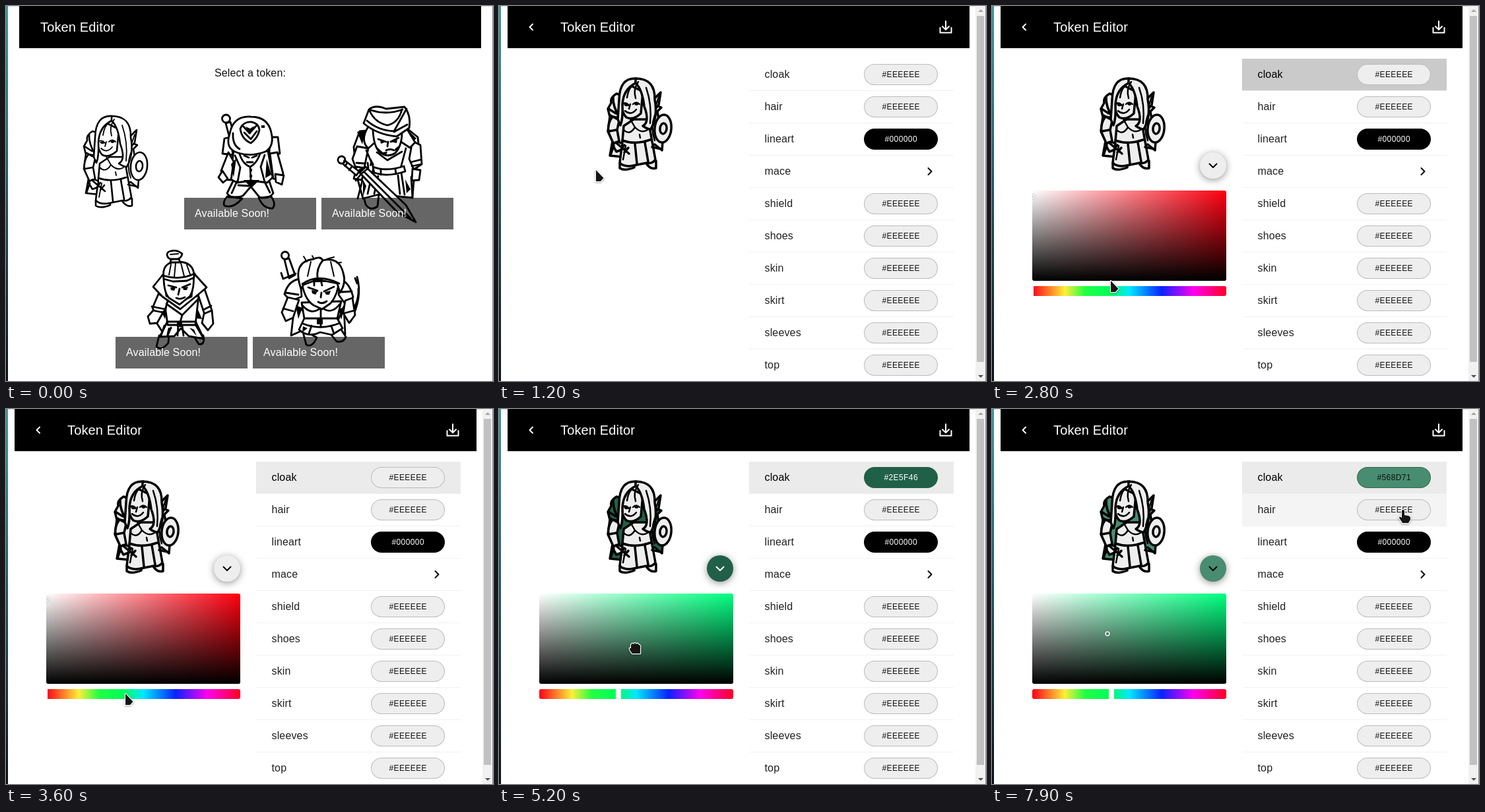
An HTML page with a canvas for the animation above (8 s loop, 738x569 px).

```html
<!DOCTYPE html>
<html lang="en">
<head>
<meta charset="utf-8">
<title>Token Editor</title>
<style>
html, body { margin: 0; width: 100%; height: 100%; overflow: hidden; background: #fff; }
canvas { display: block; width: 738px; height: 569px; }
</style>
</head>
<body>
<canvas id="stage" width="738" height="569"></canvas>
<script>
const ctx = document.getElementById('stage').getContext('2d');
const LOOP = 8000, STEP = 100;
const FONT = '"Liberation Sans", Arial, sans-serif';
const PICK = { x: 61, y: 280, w: 294, h: 137 };
const GREY = [238, 238, 238], DEEP = [32, 96, 73], SOFT = [72, 141, 113];

// Figures: [layer, path]. b = filled body, c = filled cloak, l = line, t = thin line, k = solid black
const shapes = list => list.map(([kind, d]) => [kind, new Path2D(d)]);

const elf = shapes([
  ['c', 'M178 133Q168 139 170 147L165 156 168 168 165 190 172 205 168 227 188 229 236 210 247 219 248 206 240 160 246 154 236 150Z'],
  ['b', 'M172 168Q164 178 166 192L174 210 182 205 179 188 183 170Z'],
  ['l', 'M173 138Q172 152 183 170M166 156L177 163M167 190L178 188M169 166L178 171'],
  ['b', 'M183 238L183 246Q190 251 205 245L205 236ZM222 237Q229 249 238 246L238 235Z'],
  ['b', 'M189 182L187 205 183 238Q190 245 204 242L224 238Q232 240 237 233L231 200 226 172 204 172Z'],
  ['l', 'M187 204Q206 211 229 203M206 209L209 239M221 207L226 236'],
  ['t', 'M189 188Q198 197 206 184Q216 194 225 188M199 172L206 184M192 212L188 233M213 195L214 200'],
  ['b', 'M172 211Q178 203 187 209L186 218 178 221Z'],
  ['l', 'M178 208L197 224M184 219L190 211M190 222L196 215M169 226L174 212M232 214L246 217'],
  ['b', 'M187 140Q184 160 193 169Q203 174 215 163L218 130 198 120Z'],
  ['t', 'M187 149Q192 145 197 151M203 149Q208 144 213 149M191 159Q200 167 208 157M199 149L197 156'],
  ['k', 'M189 150Q192 147 196 151Q193 154 189 150ZM205 149Q209 145 212 149Q208 153 205 149Z'],
  ['b', 'M234 142L245 131 242 150 236 157Z'],
  ['b', 'M208 110Q183 108 182 142L180 172 184 181Q188 172 187 150Q188 126 207 117Z'],
  ['b', 'M207 110Q237 110 236 142Q241 168 230 187Q225 187 218 182Q229 176 220 152Q217 126 207 117Z'],
  ['t', 'M223 124Q232 150 229 178M205 118Q196 124 194 139M211 115Q203 126 207 140M238 150L242 138'],
  ['b', 'M250 165A12.5 21 6 1 1 247 207A12.5 21 6 1 1 250 165Z'],
  ['l', 'M250 178A5 8 6 1 1 248 194A5 8 6 1 1 250 178Z'],
  ['t', 'M236 166Q229 185 236 204']
]);

const scout = shapes([
  ['b', 'M340 199L331 201 328 224 344 226ZM400 199L412 199 415 224 399 224Z'],
  ['b', 'M334 165A6 6 0 1 1 333 177A6 6 0 1 1 334 165ZM333 178L340 176 345 192 338 197Z'],
  ['b', 'M335 289Q328 298 331 303Q344 308 358 292ZM383 291Q390 308 404 307Q410 300 401 288Z'],
  ['b', 'M346 262L335 284Q341 294 359 288L371 274 384 290Q398 294 405 284L397 260Z'],
  ['b', 'M345 220L339 262 350 268 371 265 396 268 404 260 397 220Z'],
  ['b', 'M337 222L326 250 329 263 341 264 345 236ZM400 224L411 222 420 254 416 265 405 262Z'],
  ['b', 'M328 250L322 260 329 268 336 262ZM408 255L421 257 418 271 409 267Z'],
  ['l', 'M347 227L355 245 351 267M392 226L386 244 392 267M370 244L371 265M350 266L342 284M392 267L400 283M352 272L368 273M337 290L354 290M387 291L402 289'],
  ['k', 'M369 247h4v4h-4ZM369 256h4v4h-4ZM360 264L384 264 372 276ZM341 240L349 231 345 260ZM395 232L402 256 393 261Z'],
  ['b', 'M352 216Q356 239 370 244Q383 237 387 216Z'],
  ['l', 'M361 227L368 230M373 230L380 227M365 237L374 237'],
  ['b', 'M371 168Q344 166 339 194Q331 217 352 223Q372 229 393 221Q407 213 402 192Q397 168 371 168Z'],
  ['l', 'M355 186Q360 175 372 176Q383 178 384 188Q382 200 371 208Q357 202 355 186ZM360 183L369 193 379 182M361 192L371 202 380 190M344 193Q343 211 354 217'],
  ['k', 'M387 181h5v4h-5ZM363 183L370 186 376 182 370 195Z']
]);

const pirate = shapes([
  ['b', 'M541 286L545 301Q552 312 563 304L565 286Z'],
  ['b', 'M536 190L527 214 532 260 541 292 565 286 616 291 614 260 628 236 624 199 608 186Z'],
  ['b', 'M532 213L525 232 532 251 543 245 549 216ZM616 205L628 211 630 240 618 248 611 232Z'],
  ['b', 'M530 250L527 262 539 264 543 251ZM616 247L628 249 626 264 615 265Z'],
  ['l', 'M546 219L557 245 548 285M606 216L598 246 604 286M531 238L544 239M531 244L544 246M613 237L629 233M615 243L630 240M540 265L533 292M618 265L616 290'],
  ['b', 'M556 244Q576 252 603 243L605 251Q578 260 558 253Z'],
  ['l', 'M568 248L568 256M590 247L591 255M562 222L578 234 600 221M564 258L558 285M594 257L597 285'],
  ['k', 'M532 191L544 188 540 210ZM609 188L622 201 611 210ZM541 264L546 273 541 289ZM605 263L613 278 607 284ZM553 231L558 241 551 243Z'],
  ['b', 'M549 183Q536 204 549 216L559 207 600 207 612 215 620 207 606 184Z'],
  ['b', 'M556 188Q557 212 566 222Q579 231 590 223Q601 211 600 187Z'],
  ['l', 'M564 202L576 206M583 206L595 200M576 219Q582 216 588 219M579 206L578 213'],
  ['k', 'M567 203L576 206 568 209ZM583 206L593 203 592 208ZM560 212L571 222 578 221 576 226 566 222ZM589 217L598 210 591 224Z'],
  ['b', 'M542 178L550 157Q559 149 576 156L604 153Q614 166 611 185L592 198Q562 195 542 178Z'],
  ['l', 'M547 174Q564 189 588 190L607 156M551 159Q559 177 578 181Q595 177 600 157M553 158Q577 166 601 157M588 191L608 180'],
  ['b', 'M509 228A5 5 0 1 1 508 239A5 5 0 1 1 509 228ZM513 234L535 251 531 257 511 240Z'],
  ['b', 'M536 253L545 244 606 302 621 328 593 313Z'],
  ['l', 'M544 253L613 322M548 238L549 246 538 255 530 265M517 238L514 243M524 244L520 249']
]);

const monk = shapes([
  ['b', 'M232 500L228 517Q236 524 246 511L247 500ZM284 500L292 513Q302 515 299 500Z'],
  ['b', 'M244 480L233 502 255 501 265 489 277 501 300 505 287 478Z'],
  ['b', 'M239 441L245 484 287 484 292 439 264 450Z'],
  ['b', 'M231 437L222 458 225 464 240 465 246 444ZM290 435L301 430 312 462 301 468Z'],
  ['b', 'M223 462L215 471 218 482 229 481 238 465ZM300 467L312 462 314 482 306 492 297 481Z'],
  ['l', 'M221 456L241 460M299 461L311 455M243 452L267 469 290 446M267 469L263 483M244 479L288 479M240 485L235 500M288 485L298 502M261 484L260 500M267 485L269 500M250 488L245 500M229 482L236 493'],
  ['k', 'M259 480h8v7h-8ZM236 465L244 456 241 475ZM289 456L297 475 289 474ZM246 488L252 488 243 500ZM278 488L285 491 289 501Z'],
  ['b', 'M239 406L223 426 237 441 264 460 291 438 304 427 285 406 281 441 263 449 243 440Z'],
  ['b', 'M239 411Q239 434 247 443L263 453 279 440Q286 427 284 409Z'],
  ['l', 'M246 424L258 427M267 427L279 422M258 443Q264 446 271 442M263 429L261 438'],
  ['k', 'M249 427L257 427 255 432 250 431ZM268 427L276 426 274 431 269 431Z'],
  ['b', 'M239 414Q235 388 260 388Q286 388 285 412L274 417 253 418Z'],
  ['t', 'M250 392L247 408M257 390L255 411M265 390L270 410M274 393L279 407'],
  ['l', 'M238 409Q263 417 286 406'],
  ['b', 'M249 372Q259 369 267 376Q265 385 256 384Q246 386 244 378Q244 373 249 372ZM250 384L262 384 264 389 249 389Z'],
  ['t', 'M249 377L261 376']
]);

const ranger = shapes([
  ['b', 'M424 373A5 5 0 1 1 422 384A5 5 0 1 1 424 373ZM422 385L429 383 438 408 429 413Z'],
  ['l', 'M417 405L420 414 439 406M532 411Q541 442 522 479M529 413L532 421M534 429Q535 453 519 469'],
  ['b', 'M437 455L432 500 452 491 455 465ZM512 456L514 498 498 489Z'],
  ['b', 'M449 491L455 514Q464 519 471 503ZM489 494L501 509Q512 511 515 502L506 488Z'],
  ['b', 'M448 450L452 474 444 491Q457 504 476 495L494 499 510 489 502 474 508 448Z'],
  ['b', 'M446 414Q428 416 422 437L431 448 448 441ZM507 414Q522 422 526 442L514 452 504 438Z'],
  ['b', 'M427 442L418 465 424 478 435 473 444 446ZM514 447L525 443 529 469 520 481 511 466Z'],
  ['l', 'M424 435L443 438M420 459L435 463M513 466L528 462M508 434L524 433M449 454Q463 471 478 457Q493 470 507 451M453 474L502 474M450 482Q477 493 506 481M477 460L477 486M463 485L459 497M493 486L497 497'],
  ['k', 'M439 454L449 458 443 475ZM504 460L513 457 508 476ZM471 474h9v9h-9ZM450 486L457 489 449 495Z'],
  ['b', 'M448 418Q452 445 466 454L479 460 492 451Q504 436 504 417Z'],
  ['l', 'M458 427L472 432M482 433L497 426M473 449Q479 453 486 448M478 435L477 442'],
  ['k', 'M463 431L472 433 469 438 464 436ZM483 434L492 432 490 438 485 438Z'],
  ['b', 'M447 429Q433 388 466 384Q477 379 480 386Q505 380 511 405Q516 421 506 435L502 421 472 415 451 423Z'],
  ['l', 'M480 386Q470 398 472 414M449 422Q472 405 505 421M467 416L467 424M477 416L479 424'],
  ['t', 'M462 388L457 410M492 388L497 410M456 388L451 380M467 384L464 379M486 384L497 381M502 390L508 389']
]);

const tiles = [[62, 139], [270, 139], [478, 139], [166, 350], [374, 350]];
const rows = ['cloak', 'hair', 'lineart', 'mace', 'shield', 'shoes', 'skin', 'skirt', 'sleeves', 'top'];

// Pointer path: time, x, y
const path = [
  [400, 196, 142], [600, 147, 249], [1700, 147, 249], [2100, 453, 99], [2700, 453, 99],
  [2800, 180, 417], [3000, 184, 425], [3300, 179, 429], [3400, 179, 429], [3600, 181, 432],
  [4300, 181, 432], [4800, 213, 366], [5100, 213, 366], [5200, 206, 363], [6000, 175, 341],
  [7300, 175, 341], [7900, 623, 153]
];

const mix = (a, b, k) => a + (b - a) * k;
const mixColor = (a, b, k) => a.map((v, i) => Math.round(mix(v, b[i], k)));
const rgb = c => `rgb(${c})`;
const clamp = v => Math.max(0, Math.min(1, v));

function pointerAt(t) {
  if (t < path[0][0]) return null;
  let i = path.findIndex(p => p[0] > t);
  if (i < 0) return path[path.length - 1].slice(1);
  const [t0, x0, y0] = path[i - 1], [t1, x1, y1] = path[i];
  const u = (t - t0) / (t1 - t0), k = u * u * (3 - 2 * u);
  return [mix(x0, x1, k), mix(y0, y1, k)];
}

function rect(x, y, w, h, color) {
  ctx.fillStyle = color;
  ctx.fillRect(x, y, w, h);
}

function round(x, y, w, h, r, color) {
  ctx.beginPath();
  ctx.roundRect(x, y, w, h, r);
  ctx.fillStyle = color;
  ctx.fill();
}

function line(points, color, width = 2) {
  ctx.beginPath();
  points.forEach(([x, y]) => ctx.lineTo(x, y));
  ctx.strokeStyle = color;
  ctx.lineWidth = width;
  ctx.stroke();
}

function text(s, x, y, color, size = 16, spacing = 0.15, align = 'left') {
  ctx.font = `${size}px ${FONT}`;
  ctx.letterSpacing = spacing + 'px';
  ctx.textAlign = align;
  ctx.fillStyle = color;
  ctx.fillText(s, x, y);
}

function figure(parts, body, cloak, width) {
  ctx.strokeStyle = '#000';
  for (const [kind, p] of parts) {
    ctx.lineWidth = kind === 't' ? width * 0.7 : width;
    if (kind === 'b' || kind === 'c' || kind === 'k') {
      ctx.fillStyle = kind === 'b' ? body : kind === 'c' ? cloak : '#000';
      ctx.fill(p);
    }
    if (kind !== 'k') ctx.stroke(p);
  }
}

function frame(left) {
  rect(0, 0, 738, 569, '#fff');
  rect(0, 0, 738, 1, '#dcdcdc');
  const g = ctx.createLinearGradient(0, 0, 0, 569);
  g.addColorStop(0, '#3f9a9c');
  g.addColorStop(0.45, '#1f5d6a');
  g.addColorStop(1, '#0b1016');
  rect(0, 0, 3, 569, g);
  rect(737, 0, 1, 569, '#8b9092');
  rect(left, 0, 700, 64, '#000');
}

function selectScreen(t) {
  frame(20);
  text('Token Editor', 52, 39, '#fff', 20);
  text('Select a token:', 370, 107, '#111', 16, 0.15, 'center');
  const shade = t < 400 ? 0 : t < 500 ? 0.04 : 0.12;
  ctx.save();
  ctx.translate(-47, 57);
  figure(elf, '#fff', '#fff', 2.6);
  ctx.restore();
  for (const f of [scout, pirate, monk, ranger]) figure(f, '#fff', '#fff', 2.8);
  round(62, 139, 200, 200, 3, `rgba(0,0,0,${shade})`);
  for (const [x, y] of tiles.slice(1)) {
    rect(x, y + 152, 200, 48, 'rgba(0,0,0,.6)');
    text('Available Soon!', x + 16, y + 181, '#fff');
  }
}

function header() {
  frame(13);
  text('Token Editor', 93, 39, '#fff', 20);
  line([[51, 27.5], [46.5, 32], [51, 36.5]], '#fff');
  line([[668.5, 33], [668.5, 40.5], [685.5, 40.5], [685.5, 33]], '#fff');
  line([[677, 23], [677, 35]], '#fff');
  line([[672, 31], [677, 36], [682, 31]], '#fff');
}

function scrollbar() {
  rect(722, 0, 15, 569, '#f1f1f1');
  rect(724, 15, 11, 525, '#c1c1c1');
  for (const [y, d, c] of [[9, -4, '#a3a3a3'], [560, 4, '#505050']]) {
    ctx.beginPath();
    ctx.moveTo(726, y);
    ctx.lineTo(734, y);
    ctx.lineTo(730, y + d);
    ctx.fillStyle = c;
    ctx.fill();
  }
}

function pill(y, label, fill, edge, ink) {
  round(553, y, 112, 32, 16, edge);
  round(554, y + 1, 110, 30, 15, fill);
  text(label, 609.2, y + 20, ink, 12, 0.4, 'center');
}

function list(t, cloak, hover) {
  rows.forEach((name, i) => {
    const y = 80 + 49 * i, on = i === 0 && t >= 2300;
    let shade = hover === i && !on ? 0.045 : 0;
    if (on) shade = t < 2400 ? 0.16 : t < 2800 ? 0.24 : t < 3500 ? 0.208 : 0.08;
    if (shade) rect(379, y, 310, 48, `rgba(0,0,0,${shade})`);
    rect(379, y + 48, 310, 1, '#f1f1f1');
    text(name, 402.5, y + 29, on ? '#000' : '#212121');
    if (name === 'mace') line([[650.5, y + 19], [655.5, y + 24], [650.5, y + 29]], '#000');
    else if (name === 'lineart') pill(y + 8, '#000000', '#000', '#000', '#fff');
    else if (i === 0 && t >= 4800) {
      const late = t >= 6300;
      pill(y + 8, late ? '#568D71' : '#2E5F46', rgb(cloak), late ? '#34684f' : rgb(cloak), late ? '#111' : '#fff');
    } else pill(y + 8, '#EEEEEE', '#eee', '#bbb', '#111');
  });
}

function picker(t, live, spot) {
  const { x, y, w, h } = PICK, green = t >= 3900;
  ctx.save();
  ctx.shadowColor = 'rgba(0,0,0,.42)';
  ctx.shadowBlur = 11;
  ctx.shadowOffsetY = 2;
  ctx.beginPath();
  ctx.arc(335, 242, 20, 0, 7);
  ctx.fillStyle = rgb(live);
  ctx.fill();
  ctx.restore();
  line([[329.5, 239.5], [335, 245], [340.5, 239.5]], t >= 4800 && live[1] < 122 ? '#fff' : '#000');

  const hue = green ? [0, 255, 128] : [255, 0, 16];
  const tint = ctx.createLinearGradient(x, 0, x + w, 0);
  tint.addColorStop(0, '#fff');
  tint.addColorStop(1, rgb(hue));
  round(x, y, w, h, 3, tint);
  const dark = ctx.createLinearGradient(0, y, 0, y + h);
  dark.addColorStop(0, 'rgba(0,0,0,0)');
  dark.addColorStop(1, '#000');
  round(x, y, w, h, 3, dark);
  ctx.save();
  ctx.beginPath();
  ctx.rect(x, y, w, h);
  ctx.clip();
  ctx.beginPath();
  ctx.arc(spot[0], spot[1], 3, 0, 7);
  ctx.lineWidth = 1.5;
  ctx.strokeStyle = '#fff';
  ctx.shadowColor = 'rgba(0,0,0,.5)';
  ctx.shadowBlur = 2;
  ctx.stroke();
  ctx.restore();

  const bar = ctx.createLinearGradient(x, 0, x + w, 0);
  const stops = { 0: '#ff0018', 0.167: '#ffee38', 0.27: '#22ff44', 0.4: '#00ff58', 0.5: '#00e8ff', 0.667: '#0a22ff', 0.83: '#ff00f0', 1: '#ff0022' };
  for (const k in stops) bar.addColorStop(+k, stops[k]);
  round(x, 425, w, 15, 3, bar);
  round(green ? 177 : 55, 425, 8, 15, 1, '#fff');
}

const arrow = new Path2D('M0 0L11.5 12 7 17 0 17Z');
const hand = new Path2D('M-2 1Q0 -1 2 1L2 8 8 9Q12 10 11 15L8 20 -1 20 -6 12Q-6 9 -2 12Z');
const fist = new Path2D('M-6 -5Q-4 -9 -2 -6Q0 -10 2 -6Q4 -9 6 -5Q9 -5 8 0L8 8 -4 8Q-9 2 -8 0L-6 0Z');

function cursor([x, y], shape) {
  ctx.save();
  ctx.translate(x, y);
  ctx.shadowColor = 'rgba(0,0,0,.4)';
  ctx.shadowBlur = 3;
  ctx.shadowOffsetY = 1;
  ctx.strokeStyle = '#fff';
  ctx.lineWidth = 2.4;
  ctx.stroke(shape);
  ctx.shadowColor = 'transparent';
  ctx.fillStyle = '#151515';
  ctx.fill(shape);
  ctx.restore();
}

function editor(t, at) {
  const inList = at[0] > 379 && at[0] < 689;
  const hover = inList ? Math.floor((at[1] - 80) / 49) : -1;
  const cloak = t < 4800 ? GREY : t < 6300 ? DEEP : SOFT;
  const live = t < 4800 ? GREY : mixColor(DEEP, SOFT, clamp((t - 5200) / 800));
  const spot = t < 4800 ? [61, 289] : t < 6000 ? at : [175, 341];
  header();
  figure(elf, '#eee', rgb(cloak), 3.5);
  list(t, cloak, hover);
  scrollbar();
  if (t >= 2400) picker(t, live, spot);
  cursor(at, t >= 4800 && t < 6800 ? fist : inList ? hand : arrow);
}

function draw(now) {
  const t = Math.floor((now % LOOP) / STEP) * STEP;
  const at = pointerAt(t);
  ctx.lineCap = 'round';
  ctx.lineJoin = 'round';
  if (t < 1100) {
    selectScreen(t);
    if (at) cursor(at, hand);
  } else editor(t, at);
}

const start = performance.now();
function tick() {
  draw(performance.now() - start);
  requestAnimationFrame(tick);
}
tick();
</script>
</body>
</html>
```
